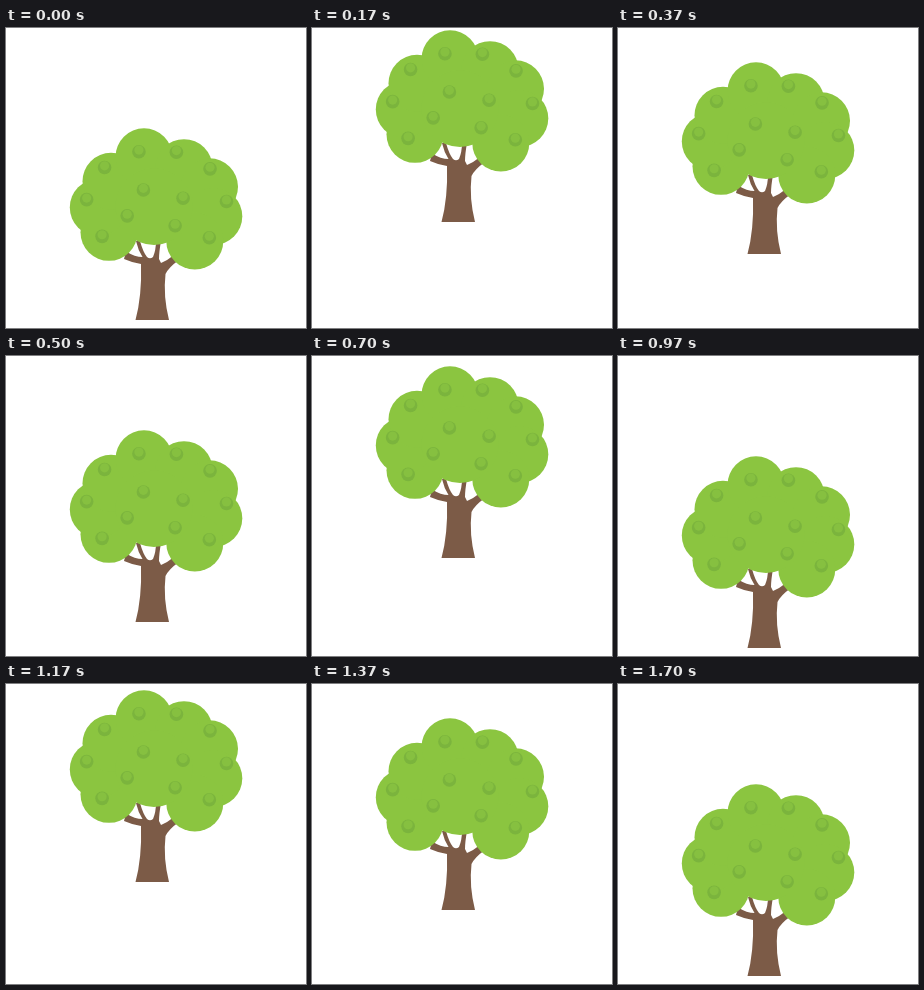
These frames come from a looping animation (300 px wide and 300 px high, 1770 ms). An HTML page with a canvas:

```html
<!DOCTYPE html>
<html lang="en">
<head>
<meta charset="utf-8">
<title>Jumping tree</title>
<style>
html, body { margin: 0; width: 100%; height: 100%; overflow: hidden; background: #fff; }
canvas { display: block; width: 300px; height: 300px; }
</style>
</head>
<body>
<canvas id="stage" width="300" height="300"></canvas>
<script>
const ctx = document.getElementById('stage').getContext('2d');
const TAU = Math.PI * 2;
const LOOP = 1770;
const HOP = 14;
const LOBE_RADIUS = 28.5;

// Pace of the three hops: step number and distance travelled along them.
const pace = [[0, 0], [2, 7], [5, 13], [10, 28], [14, 39], [17, 42]];

// Centres of the outer leaf lobes, clockwise from the lower left.
const lobes = [
  [103, 204.3], [92.3, 179.5], [105, 153.3], [138, 128.8],
  [178, 139.7], [203.5, 158.8], [207.8, 188.3], [188.8, 213]
];

const trunk = new Path2D(`M129.5 292 Q136 268 135 236 Q127 235 118 231 L120 223.5
  Q129 229 136.5 229 Q132 222 130 213 L134 213 Q137 224 141 229 Q144 231.5 147 229
  Q150 222 150 213 L155 213 Q153 224 153 231 L155 235 Q162 232 168 227
  L173 232 Q163 239 159.5 246 Q157 268 163 292 Z`);

const fruits = [
  ...ring(8, 150.5, 175, 70, 53, 141, 401, 7),
  ...ring(4, 150.5, 181, 31, 21, 161, 413, 0)
];

// Points on an elliptic arc; bunch moves them closer together around its middle.
function ring(count, cx, cy, rx, ry, from, to, bunch) {
  return Array.from({ length: count }, (_, i) => {
    const part = i / (count - 1);
    const degrees = from + (to - from) * part + bunch * Math.sin(TAU * part);
    const angle = degrees * TAU / 360;
    return [cx + rx * Math.cos(angle), cy + ry * Math.sin(angle)];
  });
}

function disc(x, y, r, color) {
  ctx.fillStyle = color;
  ctx.beginPath();
  ctx.arc(x, y, r, 0, TAU);
  ctx.fill();
}

// Steps come in pairs every 200 ms: a short one of 70 ms, then a long one.
function stepAt(time) {
  if (time < 100) return 0;
  const sincePair = (time - 100) % 200;
  return 2 * Math.floor((time - 100) / 200) + (sincePair < 70 ? 1 : 2);
}

function travelAt(step) {
  const next = Math.max(1, pace.findIndex(([at]) => at >= step));
  const [[s0, d0], [s1, d1]] = [pace[next - 1], pace[next]];
  return d0 + (d1 - d0) * (step - s0) / (s1 - s0);
}

// Each hop is a parabola.
function heightAt(time) {
  const fromPeak = travelAt(stepAt(time)) % HOP - HOP / 2;
  return Math.round(2 * (HOP * HOP / 4 - fromPeak * fromPeak));
}

function drawCrown() {
  const green = '#8bc540';
  ctx.fillStyle = green;
  ctx.beginPath();
  for (const [x, y] of lobes) ctx.lineTo(x, y);
  ctx.fill();
  for (const [x, y] of lobes) disc(x, y, LOBE_RADIUS, green);
  disc(148, 178.5, 38.5, green);
  for (const [x, y] of fruits) {
    disc(x, y, 6.8, '#7bb43d');
    disc(x, y - 1.6, 4.6, '#86c040');
  }
}

function draw(time) {
  ctx.fillStyle = '#fff';
  ctx.fillRect(0, 0, 300, 300);
  ctx.save();
  ctx.translate(0, -heightAt(time % LOOP));
  ctx.fillStyle = '#7c5b47';
  ctx.fill(trunk);
  drawCrown();
  ctx.restore();
}

let begin;
function tick(now) {
  begin ??= now;
  draw(now - begin);
  requestAnimationFrame(tick);
}
draw(0);
requestAnimationFrame(tick);
</script>
</body>
</html>
```
